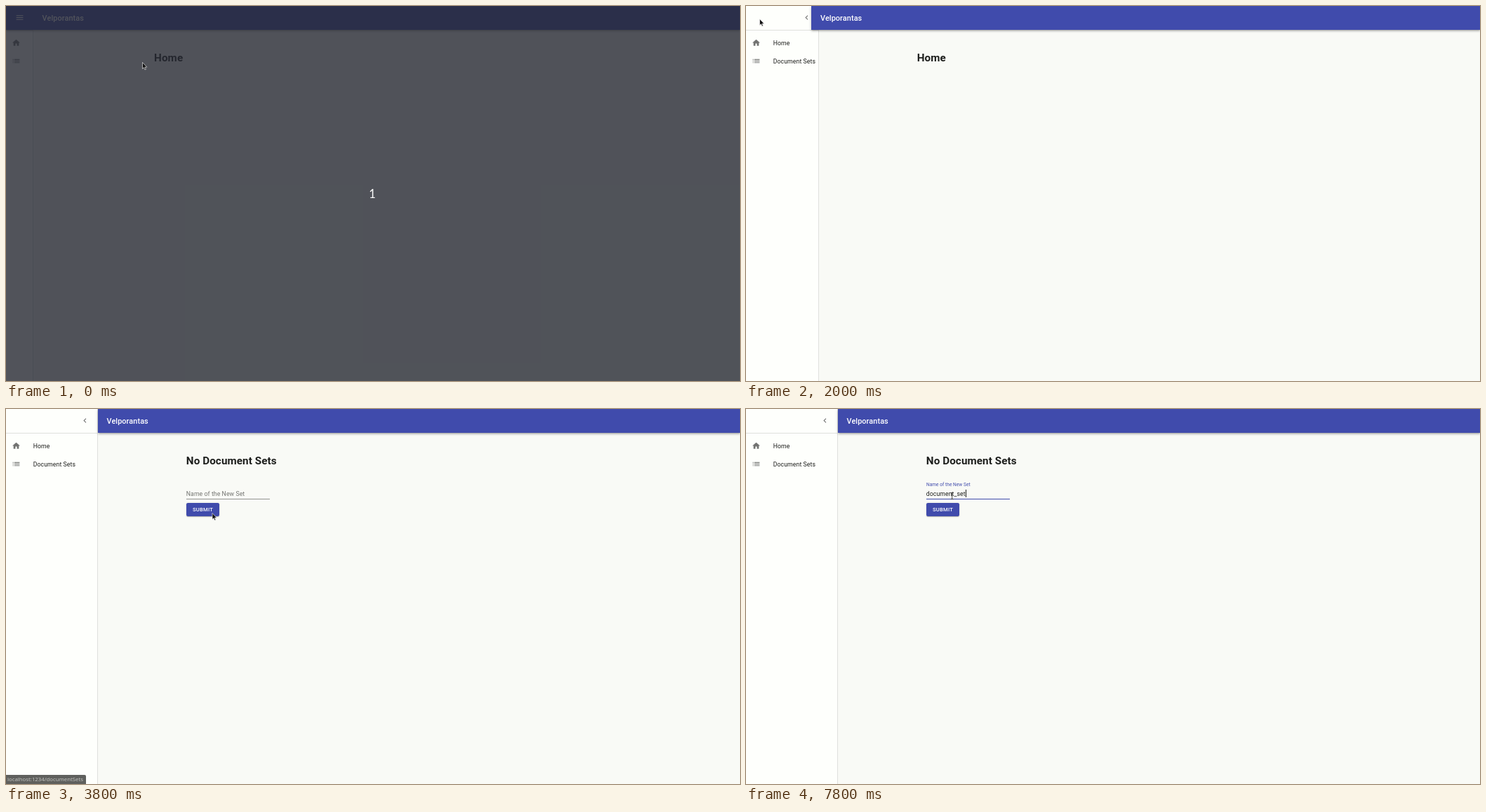
Animation of 1046x535 px, one loop 8000 ms. Source, as an HTML page:

```html
<!DOCTYPE html>
<html lang="en">
<head>
<meta charset="utf-8">
<title>Document sets demo</title>
<style>
  html, body { margin: 0; width: 100%; height: 100%; overflow: hidden; }
  #stage {
    --open: 0;
    --w: calc(39.1px + var(--open) * 91.4px);
    position: relative; width: 1046px; height: 535px; overflow: hidden;
    background: #f9faf6; color: #1e1f1d;
    font: 8.7px/20px Roboto, sans-serif; letter-spacing: .0815px;
  }
  #stage * { position: absolute; box-sizing: border-box; white-space: pre; }
  svg { overflow: visible; }
  .icon { width: 13.05px; height: 13.05px; fill: #727371; }

  #drawer {
    left: 0; top: 0; width: var(--w); height: 535px; overflow: hidden;
    background: #fefffc; border-right: 1px solid #dfe0dd;
  }
  #drawer .line { left: 0; top: 34px; width: 100%; height: 1px; background: #dfe0dd; }
  #drawer .icon { left: 8.3px; }
  #drawer .label { left: 38.8px; }
  #drawer #chevron { left: calc(var(--w) - 24.5px); top: 10.4px; }
  #row { left: 0; top: 65.5px; width: 131px; height: 26px; overflow: hidden; }
  .ripple { border-radius: 50%; transform: translate(-50%, -50%); }
  #rowRipple { left: 56px; top: 13px; background: #000; }
  #menuRipple { left: 19px; top: 17px; background: #fff; }

  #bar {
    left: calc(var(--open) * 130.5px); right: 0; top: 0; height: 34px;
    background: #404bac; color: #fff;
    box-shadow: 0 1px 2px -.5px #0003, 0 2px 3px #00000024, 0 .5px 5px #0000001f;
  }
  #title { top: 8px; font-size: 10.87px; font-weight: 500; }
  #menu { left: 12.5px; top: 10.4px; fill: #fff; }

  #content { left: calc(211.1px + var(--open) * 45.7px); top: 0; }
  #heading { left: 0; top: 64px; font-size: 15.22px; font-weight: 700; }
  #form { left: 0; top: 0; }
  #name { left: 0; top: 111px; transform-origin: 0 50%; }
  #hint { left: 0; top: 111px; color: #a0a19e; }
  #typed { left: 0; top: 115px; height: 11px; line-height: 12px; border-right: 1px solid; }
  .rule { left: 0; width: 119.2px; }
  #idle { top: 128px; height: 1px; background: #929390; }
  #active { top: 127.8px; height: 1.3px; background: #404bac; }
  #submit {
    left: 0; top: 133.8px; width: 47.4px; height: 19.6px; border-radius: 2.2px;
    background: #404bac; color: #fff; text-align: center;
    font-size: 7.61px; font-weight: 500; line-height: 19.8px; letter-spacing: .02857em;
    box-shadow: 0 1.6px .5px -1px #0003, 0 1px 1px #00000024, 0 .5px 2.7px #0000001f;
  }

  #status {
    left: 0; top: 522px; width: 113.8px; height: 13px; padding-left: 2px;
    background: #383936; color: #b4b5b1; border-top-right-radius: 2px;
    font: 7.78px/13.4px "Noto Sans", sans-serif; letter-spacing: 0;
  }
  #shade {
    inset: 0; padding-right: 2px; background: rgba(38, 41, 50, .8);
    color: #fff; text-align: center; font: 16.5px/537px Lato, sans-serif;
  }
  #pointer { left: 0; top: 0; width: 1px; height: 1px; }
  #pointer path { fill: #111; stroke: #fff; stroke-width: .6; }
  #pointer #beam { fill: none; stroke: #333; stroke-width: .9; }
</style>
</head>
<body>
<div id="stage">
  <div id="content">
    <div id="heading"></div>
    <div id="form">
      <div id="name">Name of the New Set</div>
      <div id="hint">sensitive_collection_1</div>
      <div id="typed"></div>
      <div id="idle" class="rule"></div>
      <div id="active" class="rule"></div>
      <div id="submit">SUBMIT</div>
    </div>
  </div>

  <div id="drawer">
    <svg id="chevron" class="icon" viewBox="0 0 24 24"><path d="M15.41 7.41 14 6l-6 6 6 6 1.41-1.41L10.83 12z"/></svg>
    <div class="line"></div>
    <svg class="icon" style="top:45.7px" viewBox="0 0 24 24"><path d="M10 20v-6h4v6h5v-8h3L12 3 2 12h3v8z"/></svg>
    <div class="label" style="top:43px">Home</div>
    <div id="row"><div id="rowRipple" class="ripple"></div></div>
    <svg class="icon" style="top:72px" viewBox="0 0 24 24"><path d="M3 7h2v2H3zm0 4h2v2H3zm0 4h2v2H3zM7 7h14v2H7zm0 4h14v2H7zm0 4h14v2H7z"/></svg>
    <div class="label" style="top:69px">Document Sets</div>
  </div>

  <div id="bar">
    <div id="menuRipple" class="ripple"></div>
    <svg id="menu" class="icon" viewBox="0 0 24 24"><path d="M3 6h18v2H3zm0 5h18v2H3zm0 5h18v2H3z"/></svg>
    <div id="title">Velporantas</div>
  </div>

  <div id="status">localhost:1234/documentSets</div>
  <div id="shade">1</div>
  <svg id="pointer">
    <path id="arrow" d="M0 0V9L2 7.2 3.4 10.4 4.9 9.8 3.5 6.7H6.3Z"/>
    <path id="hand" d="M-1.2 .2Q0-.8 1 .2V3L5.2 4Q6 4.4 5.8 5.5L5 9H-.8L-3 5.6Q-3.2 4.6-2.2 4.7L-1.2 5.4Z"/>
    <path id="beam" d="M-1.8-4.6H-.5L0-4.1 .5-4.6H1.8M0-4.1V4.1M-1.8 4.6H-.5L0 4.1 .5 4.6H1.8"/>
  </svg>
</div>

<script>
const LOOP = 8000, TICK = 100;
const el = Object.fromEntries([...document.querySelectorAll('[id]')].map(e => [e.id, e]));

const clamp = (v, lo, hi) => Math.min(hi, Math.max(lo, v));
const mix = (a, b, p) => a + (b - a) * p;
const ramp = (t, start, end) => clamp((t - start) / (end - start), 0, 1);
const ease = (t, start, end) => {
  const p = ramp(t, start, end);
  return p * p * (3 - 2 * p);
};
const show = (e, on) => { e.style.display = on ? '' : 'none'; };

// Each stop is reached by one eased move of the hand.
const origin = { x: 194.5, y: 80.5 };
const stops = [
  { from: 100, to: 300, x: 172.5, y: 71.5 },
  { from: 400, to: 800, x: 4.5, y: 17.5 },
  { from: 900, to: 1000, x: 19.5, y: 18.5 },
  { from: 2100, to: 2700, x: 56.5, y: 78.5 },
  { from: 3400, to: 3800, x: 294, y: 148.5 },
  { from: 3800, to: 4000, x: 285, y: 108.5 },
  { from: 4600, to: 4700, x: 293.7, y: 124 }
];

function pointerAt(t) {
  return stops.reduce((pos, s) => {
    const p = ease(t, s.from, s.to);
    return { x: mix(pos.x, s.x, p), y: mix(pos.y, s.y, p) };
  }, origin);
}

// Number of keys pressed in a burst of evenly spaced keys
const burst = (t, start, gap, keys) => clamp(Math.floor((t - start) / gap) + 1, 0, keys);

function ripple(e, r, alpha) {
  e.style.width = e.style.height = 2 * r + 'px';
  e.style.opacity = alpha;
}

function drawPage(t) {
  const open = ease(t, 1854, 2080);
  el.stage.style.setProperty('--open', open);
  el.title.style.left = (open ? 13 : 51.6) + 'px';
  show(el.menu, !open);
  show(el.shade, t < 100);

  ripple(el.menuRipple, 9, t >= 1800 && !open ? .25 : 0);
  ripple(el.rowRipple, Math.max(0, t - 2900) * .21, .185 * (1 - ramp(t, 3100, 3300)));
  el.status.style.opacity = t < 2700 ? 0 : 1 - ease(t, 3720, 4000);

  const listed = t >= 3100;
  el.heading.textContent = listed ? 'No Document Sets' : 'Home';
  show(el.form, listed);
}

function drawField(t) {
  const focus = ease(t, 4880, 5060);
  el.name.style.transform = `translateY(${-13.6 * focus}px) scale(${1 - focus / 4})`;
  el.name.style.color = `color-mix(in srgb, #404bac ${focus * 100}%, #747572)`;
  el.active.style.transform = `scaleX(${focus})`;

  const count = burst(t, 6300, 200, 2) + burst(t, 6700, 50, 5) + burst(t, 7500, 75, 5);
  el.typed.textContent = 'document_set'.slice(0, count);
  el.hint.style.opacity = count ? 0 : focus;
  show(el.typed, count || (t >= 5000 && t < 5400));
}

function drawPointer(t) {
  const { x, y } = pointerAt(t);
  const shape = t >= 4700 ? 'beam' : t >= 2700 && t < 3600 ? 'hand' : 'arrow';
  for (const id of ['arrow', 'hand', 'beam']) show(el[id], id === shape);
  el.pointer.style.transform = `translate(${x}px, ${y}px)`;
}

function loop() {
  const now = performance.now() % LOOP;
  const t = now - now % TICK;
  drawPage(t);
  drawField(t);
  drawPointer(t);
  requestAnimationFrame(loop);
}
loop();
</script>
</body>
</html>
```
